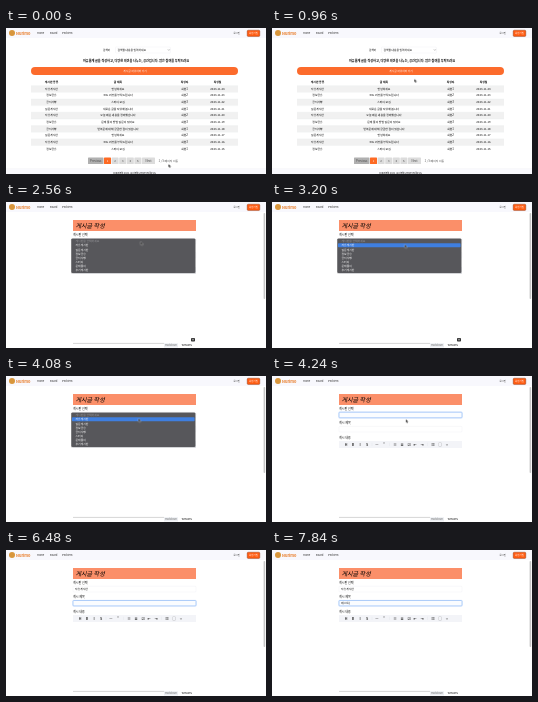
These frames come from a looping animation (260 by 146 pixels, 8000 ms). An HTML page:

```html
<!DOCTYPE html>
<html>
<head>
<meta charset="utf-8">
<style>
html, body { margin: 0; width: 100%; height: 100%; overflow: hidden; background: #fff; }
svg { display: block; width: 260px; height: 146px; }
text { font: 500 2.8px "Noto Sans CJK KR", "Noto Sans CJK", "Noto Sans", sans-serif; fill: #000; }
.mid { text-anchor: middle; }
.dim { fill: #444; }
.white { fill: #fff; }
.bold { font-weight: 700; }
.nav { font-size: 2.6px; fill: #222; }
.title { font-size: 3px; }
.box { fill: #fff; stroke: #eceef1; stroke-width: .4; }
.focus { fill: #fafcff; stroke: #9dc3f8; stroke-width: .8; }
.glow { fill: #e6f0ff; }

.list, .form, .menu, .pick, .badge, .sel, .chosen, .field, .caret, .pointer {
  animation: 8s step-end infinite;
}
.typed text { visibility: hidden; }
.list { animation-name: list; }
.form { animation-name: form; }
.menu { animation-name: menu; }
.pick { animation-name: pick; }
.badge { animation-name: badge; }
.sel { animation-name: sel; }
.chosen { animation-name: chosen; }
.field { animation-name: field; }
.caret { animation-name: caret; }
.pointer { animation-name: pointer; }
@keyframes list { 0% { visibility: visible } 20%, 100% { visibility: hidden } }
@keyframes form { 0% { visibility: hidden } 20%, 100% { visibility: visible } }
@keyframes menu { 0% { visibility: hidden } 32% { visibility: visible } 53%, 100% { visibility: hidden } }
@keyframes pick { 0% { opacity: 0 } 38% { opacity: 1 } 51.5% { opacity: 0 } 52%, 100% { opacity: 1 } }
@keyframes badge { 0% { opacity: 0 } 32% { opacity: 1 } 41%, 100% { opacity: 0 } }
@keyframes sel { 0% { visibility: hidden } 53% { visibility: visible } 61%, 100% { visibility: hidden } }
@keyframes chosen { 0% { visibility: hidden } 55%, 100% { visibility: visible } }
@keyframes field { 0% { visibility: hidden } 61%, 100% { visibility: visible } }
@keyframes caret {
  0% { opacity: 0; transform: none }
  70% { opacity: 1 } 75% { opacity: 0 } 79% { opacity: 1 } 81% { opacity: 0; transform: none }
  86% { opacity: 1; transform: translateX(2.6px) }
  89% { opacity: 1; transform: translateX(5.2px) }
  97%, 100% { opacity: 1; transform: translateX(7.8px) }
}
@keyframes pointer {
  0%, 4% { transform: translate(162.4px, 136px); animation-timing-function: ease-in-out }
  7%, 9% { transform: translate(156px, 69px); animation-timing-function: ease-in-out }
  14%, 25% { transform: translate(135.6px, 42px); animation-timing-function: ease-in-out }
  30%, 34% { transform: translate(134.6px, 39.5px); animation-timing-function: ease-in-out }
  41%, 43% { transform: translate(132.6px, 42.6px); animation-timing-function: linear }
  51% { transform: translate(132.4px, 42.4px); animation-timing-function: ease-in-out }
  53%, 55% { transform: translate(133.8px, 43.2px); animation-timing-function: ease-in-out }
  60% { transform: translate(126px, 52px); visibility: visible }
  70%, 100% { transform: translate(126px, 52px); visibility: hidden }
}
</style>
</head>
<body>
<svg viewBox="0 0 260 146">
  <g class="list">
    <text x="97" y="23.2" style="font-size:2.6px">검색어</text>
    <rect class="box" x="109.5" y="19" width="55" height="6" rx=".8"/>
    <text x="111.5" y="23" style="font-size:2.7px">검색할 내용을 입력하세요</text>
    <path d="M162 21.5l.8.8.8-.8" fill="none" stroke="#333" stroke-width=".4"/>
    <text class="mid bold" x="130" y="34.1" style="font-size:3.1px">자유롭게 글을 작성하고, 다양한 의견을 나누는, 공간입니다. 많은 참여를 부탁드려요</text>
    <rect x="25" y="39" width="207" height="8" rx="4" fill="#fc6b2c"/>
    <text class="mid white" x="129" y="44" style="font-size:2.7px">게시글 작성하러 가기</text>
    <g id="table"></g>
    <g id="pages"></g>
    <path d="M0 140.6h260" stroke="#eceef2" stroke-width=".4"/>
    <rect y="141" width="260" height="5" fill="#f9f9fd"/>
    <text class="mid" x="128.5" y="145.7" style="font-size:2.3px">Copyright 2023. All rights reserved by us.</text>
  </g>

  <g class="form">
    <rect x="67" y="18" width="123" height="11" fill="#fb8f69"/>
    <text transform="translate(69.4 26.2) skewX(-12)" style="font-size:6.1px">게시글 작성</text>
    <text class="title" x="67" y="34">게시판 선택</text>
    <rect class="box" x="67" y="36.2" width="123" height="5.8" rx=".8"/>
    <g class="sel">
      <rect class="glow" x="66.4" y="35.4" width="124.2" height="7.2" rx="1.2"/>
      <rect class="focus" x="67" y="36.2" width="123" height="5.6" rx=".8"/>
    </g>
    <text class="chosen" x="69" y="40.2">자유게시판</text>
    <text class="title" x="67" y="48.2">게시 제목</text>
    <rect class="box" x="67" y="50.4" width="123" height="5.6" rx=".8"/>
    <g class="field">
      <rect class="glow" x="66.4" y="49.8" width="124.2" height="6.8" rx="1.2"/>
      <rect class="focus" x="67" y="50.5" width="123" height="5.4" rx=".8"/>
    </g>
    <g class="typed" id="typed"></g>
    <path class="caret" d="M69.4 51.8v2.8" stroke="#222" stroke-width=".4"/>
    <text class="title" x="67" y="62.6">게시 내용</text>
    <rect x="67" y="65" width="123" height="7" fill="#f3f4f8"/>
    <g id="tools"></g>
    <path d="M67 141.4h91" stroke="#aaa" stroke-width=".5"/>
    <rect x="158" y="141.3" width="14" height="4.2" fill="#eceef2"/>
    <text class="mid" x="165" y="144.3" style="font-size:2.4px;fill:#666">Markdown</text>
    <text class="mid" x="181" y="144.3" style="font-size:2.4px">WYSIWYG</text>
    <rect x="257.6" y="11" width="1.6" height="86" rx=".8" fill="#c6c6c6"/>
  </g>

  <g class="menu">
    <rect x="65" y="37" width="125" height="34.8" rx="1.2" fill="#000" opacity=".18"/>
    <rect x="65.3" y="36.4" width="124" height="34.6" rx="1.2" fill="#57575b"/>
    <rect class="pick" x="66" y="41.2" width="122.6" height="4" rx=".7" fill="#3f7fe0"/>
    <g id="options"></g>
    <g class="badge">
      <rect x="185" y="136" width="4" height="3.6" rx=".8" fill="#333"/>
      <path d="M186 137.3h2M187 137.3v1.4" stroke="#fff" stroke-width=".4"/>
    </g>
  </g>

  <rect width="260" height="10" fill="#f8f8fd"/>
  <circle cx="6" cy="5" r="3" fill="#d8963c"/>
  <text class="bold" x="10" y="6.5" style="font-size:3.9px;fill:#e87a25">Nurimo</text>
  <text class="nav" x="31" y="5.8">Home</text>
  <text class="nav" x="44" y="5.8">Board</text>
  <text class="nav" x="56" y="5.8">Problem</text>
  <text class="nav" x="227.5" y="5.8" style="font-size:2.3px">로그인</text>
  <rect x="241.2" y="2.2" width="12.6" height="6.2" rx="1" fill="#ff5c12" stroke="#7a3418" stroke-width=".4"/>
  <text class="mid white" x="247.5" y="6.1" style="font-size:2.4px">회원가입</text>

  <path class="pointer" d="M0 0v3.4l.8-.7.6 1.3.7-.3-.6-1.3h1.1z" fill="#111" stroke="#fff" stroke-width=".3"/>
</svg>
<script>
const byId = id => document.getElementById(id);
const label = (x, y, s, cls = 'mid', style = '') =>
  `<text x="${x}" y="${y}" class="${cls}" style="${style}">${s}</text>`;

// Board table
const cols = [45.5, 112, 178.5, 211.5];
const boards = ['자유게시판', '질문게시판', '공지사항', '정보공유'];
const titles = ['안녕하세요', '오늘 배운 내용을 정리했습니다', '코드 리뷰를 부탁드립니다', '문제 풀이 방법 질문이 있어요',
  '스터디 모집', '반복문에 대해 궁금한 점이 있습니다', '새로운 글을 작성해 봅니다'];
const row = (cells, y, cls) => cells.map((s, i) => label(cols[i], y, s, cls)).join('');
let table = row(['게시판 종류', '글 제목', '작성자', '작성일'], 55.3, 'mid bold');
for (let i = 0; i < 10; i++) {
  const y = 57.7 + i * 6.65;
  table += `<rect x="25" y="${y}" width="207" height="6.65" fill="${i % 2 ? '#fff' : '#f1f1f1'}"/>
    <path d="M25 ${y}h207" stroke="#e4e6e8" stroke-width=".3"/>`;
  table += row([boards[i * 3 % 4], titles[i * 2 % 7], '회원' + (i % 3 + 1), `2023-11-${24 - i}`], y + 4.1, 'mid');
}
byId('table').innerHTML = table;

// Pagination: left edge, width, label, fill
const pages = [[82, 15.5, 'Previous', '#b0b0b0'], [98, 7, '1', '#fd6a24'], [105.6, 7, '2', '#dcdcdc'],
  [113.2, 7, '3', '#dcdcdc'], [120.8, 7, '4', '#dcdcdc'], [128.4, 7, '5', '#dcdcdc'], [136, 13, 'Next', '#dcdcdc']];
byId('pages').innerHTML = pages.map(([x, w, s, fill]) =>
  `<rect x="${x}" y="129.5" width="${w}" height="6.5" rx=".6" fill="${fill}"/>` +
  label(x + w / 2, 133.7, s, s === '1' ? 'mid white' : 'mid dim')).join('') +
  label(152.5, 133.7, '1 / 5 페이지 이동', 'dim');

// Editor toolbar
const icons = ['H', 'B', 'I', 'S', '—', '“', '≡', '≣', '☑', '⇤', '⇥', '▦', '▢', '‹›'];
const spots = [74, 81, 88, 95, 105, 112, 123, 130, 137, 143, 150, 161, 168, 175];
byId('tools').innerHTML = icons.map((s, i) =>
  label(spots[i], 69.8, s, 'mid bold', 'font-size:3.6px;fill:#444')).join('') +
  [100, 117.5, 155.5].map(x => `<path d="M${x} 66.8v3.2" stroke="#dcdfe5" stroke-width=".3"/>`).join('');

// Drop-down entries
const options = ['게시판을 선택하세요', '자유게시판', '질문게시판', '정보공유', '공지사항', '스터디', '문제풀이', '후기게시판'];
byId('options').innerHTML = options.map((s, i) =>
  label(69.5, 40.3 + i * 4.13, s, i ? 'white' : '', i ? '' : 'fill:#99999d')).join('');

// Typed title, one syllable state at a time
const steps = [[6880, 'ㅌ'], [6960, '테'], [7120, '텟'], [7200, '테스'], [7760, '테스ㅌ'], [7840, '테스트'], [8000]];
byId('typed').innerHTML = steps.slice(0, -1).map(([, s]) => label(69.2, 54.2, s, '')).join('');
[...byId('typed').children].forEach((el, i) => {
  const from = steps[i][0] / 8000, to = steps[i + 1][0] / 8000;
  const keys = [{ offset: 0, visibility: 'hidden' }, { offset: from, visibility: 'visible' }];
  if (to < 1) keys.push({ offset: to, visibility: 'hidden' });
  keys.push({ offset: 1, visibility: to < 1 ? 'hidden' : 'visible' });
  el.animate(keys.map(k => ({ ...k, easing: 'step-end' })), { duration: 8000, iterations: Infinity });
});
</script>
</body>
</html>
```
